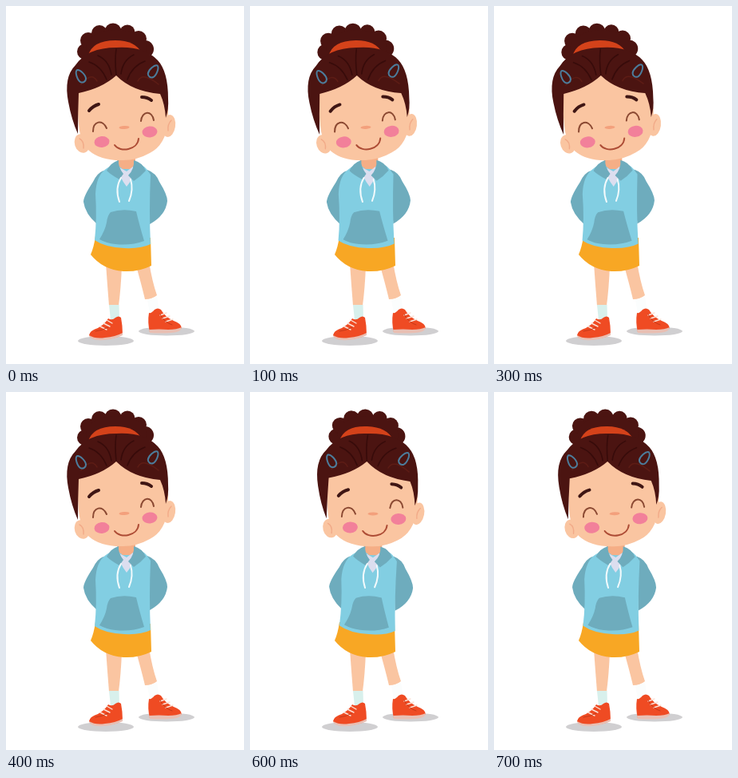
An HTML page with a canvas for the animation above (800 ms loop, 298 by 448 pixels).

```html
<!DOCTYPE html>
<html lang="en">
<head>
<meta charset="utf-8">
<title>Swaying girl</title>
<style>
html, body { margin: 0; width: 100%; height: 100%; overflow: hidden; background: #fff; }
canvas { display: block; width: 298px; height: 448px; }
</style>
</head>
<body>
<canvas id="stage" width="298" height="448"></canvas>
<script>
const ctx = document.getElementById('stage').getContext('2d');
const SKIN = '#fac5a1', SKIN_DARK = '#f5ae86', HAIR = '#4b1411', STRAND = '#370b0a';
const BLUE = '#82cee2', TEAL = '#6eacbd', ORANGE = '#f8a724', RED = '#ef4b23';

function fill(d, color) {
  ctx.fillStyle = color;
  ctx.fill(new Path2D(d));
}

function line(d, color, width) {
  ctx.strokeStyle = color;
  ctx.lineWidth = width;
  ctx.stroke(new Path2D(d));
}

function oval(x, y, rx, ry, color, angle = 0) {
  ctx.fillStyle = color;
  ctx.beginPath();
  ctx.ellipse(x, y, rx, ry, angle, 0, Math.PI * 2);
  ctx.fill();
}

// Draws a part turned by some degrees about a point near the hips.
function turned(x, y, degrees, draw) {
  ctx.save();
  ctx.translate(x, y);
  ctx.rotate(degrees * Math.PI / 180);
  ctx.translate(-x, -y);
  draw();
  ctx.restore();
}

function legs() {
  oval(125, 419, 35, 6, '#d0cfd1');
  oval(201, 407, 35, 5.5, '#d0cfd1');
  fill('M125 322L145 325Q144 352 141 375L129 375Q127 350 125 322Z', SKIN);
  fill('M162 322L179 320Q183 345 189 362Q183 367 174 367Q169 346 162 322Z', SKIN);
  fill('M129 374L141.500 374L142 393L131 393Z', '#d8f0ec');
  fill('M177 368L189 364L192 382L180 384Z', '#fbfdfd');

  fill('M104 412Q105 406 115 403Q124 398 128 391Q133 394 137 390Q141 387 144 390Q146 400 146 411Q137 417 119 417Q106 418 104 412Z', RED);
  fill('M104 412Q112 417 124 415Q137 414 146 409L146 412Q136 417 122 418Q105 419 104 412Z', '#e9bfb3');
  line('M118 401L126 405M122 397L130 401M126 393L133 397', '#fbe3d8', 1.4);
  line('M112 407Q121 406 128 402', '#c73919', 1);

  fill('M179 384Q182 385 186 380Q190 377 194 380Q199 389 210 394Q219 397 220 403Q215 408 201 407Q191 408 180 408Q177 396 179 384Z', RED);
  fill('M179 405Q192 404 203 405Q214 405 220 402Q220 408 207 409Q192 410 180 409Z', '#e9bfb3');
  line('M193 387L201 384M196 391L205 388M200 395L209 392', '#fbe3d8', 1.4);
  line('M193 386Q198 396 208 399', '#c73919', 1);

  fill('M112 288Q110 302 106 311Q121 330 147 332Q166 333 182 325L181 290Z', ORANGE);
}

function hoodie() {
  fill('M122 206Q114 209 109 220Q97 238 97 245Q99 260 114 273L121 263Z', TEAL);
  fill('M177 205Q188 209 192 220Q202 236 202 244Q200 262 180 273Z', TEAL);
  fill('M139 188H162V205L151 216L140 204Z', SKIN_DARK);
  fill('M125 204Q137 195 146 204L156 204Q166 193 176 204L181 211Q179 258 181 298Q169 304 148 303Q124 302 111 293Q114 266 112 235Q113 212 125 204Z', BLUE);
  fill('M140 201L151 207L159 201Q160 216 151 226Q142 215 140 201Z', '#dcdeef');
  fill('M126 206Q131 196 141 193Q140 201 147 210L142 217Q131 211 126 206Z', TEAL);
  fill('M160 193Q171 196 175 206Q168 214 160 219L153 212Q161 204 160 193Z', TEAL);
  fill('M131 258Q146 253 163 257Q167 274 173 294Q157 300 137 298Q126 297 117 292Q124 281 126 271Q127 262 131 258Z', TEAL);
  line('M144 215Q136 228 142 245M156 217Q160 230 154 244', '#f2fafc', 2);
}

function clip(x, y, angle) {
  ctx.save();
  ctx.translate(x, y);
  ctx.rotate(angle);
  line('M0 -8C4 -7 6 3 4 7C2 10 -2 10 -4 7C-6 3 -4 -7 0 -8Z', '#4c7d9c', 2);
  ctx.restore();
}

function head() {
  const bun = [[99, 57, 10], [103, 43, 10], [117, 34, 10], [134, 32, 10.5],
    [152, 33, 9.5], [166, 41, 10], [174, 54, 11]];
  for (const [x, y, r] of bun) oval(x, y, r, r, HAIR);
  oval(138, 53, 38, 23, HAIR);

  oval(95, 172, 9, 12, SKIN, -0.3);
  oval(204, 150, 8, 14, SKIN, 0.15);
  fill('M86 88Q138 60 198 88Q204 120 203 144Q200 174 180 184Q164 193 147 193Q119 194 104 181Q93 171 91 148Q89 120 86 88Z', SKIN);
  line('M92 166Q98 169 97 178M207 143Q202 148 203 156', '#f2aa88', 1.4);

  fill('M103 62Q108 43 137 43Q162 43 170 59L160 66H111Z', '#d4421a');
  fill('M90 160Q82 142 78 120Q72 89 87 74Q102 52 138 52Q173 50 190 68Q203 82 203 116Q204 129 200 140Q199 123 193 110Q158 107 138 87Q120 103 91 109Q90 133 90 160Z', HAIR);
  line('M138 86Q136 67 138 54M132 86Q129 68 115 62M126 92Q119 75 104 70M144 85Q146 68 160 61M152 92Q158 75 174 69', STRAND, 1.6);
  line('M114 94Q107 82 94 98M165 94Q171 82 191 98', '#5d1c15', 1.5);
  clip(93, 87, -0.55);
  clip(185, 81, 0.6);

  line('M104 131Q109 125 116 123', '#3f1614', 4);
  line('M170 114Q177 114 182 118', '#3f1614', 4);
  line('M109 157C109 144 121 141 126 153M169 144C170 131 183 130 185 143', '#8b4932', 2);
  oval(148, 152, 6.5, 2, '#f3a07c', -0.05);
  oval(120, 170, 9.5, 7, '#f2809a', -0.1);
  oval(180, 157.500, 9.5, 7, '#f2809a', -0.1);
  line('M136 174C143 184 165 180 166 166', '#ad4c35', 2);
}

function draw(now) {
  const step = Math.floor(now / 100) % 8;
  const sway = Math.abs((step + 6) % 8 - 4) - 2;
  ctx.fillStyle = '#fff';
  ctx.fillRect(0, 0, 298, 448);
  ctx.lineCap = ctx.lineJoin = 'round';
  legs();
  turned(145, 330, -sway * 0.7, hoodie);
  turned(140, 325, -sway, head);
}

const start = performance.now();
function tick() {
  draw(performance.now() - start);
  requestAnimationFrame(tick);
}
tick();
</script>
</body>
</html>
```
